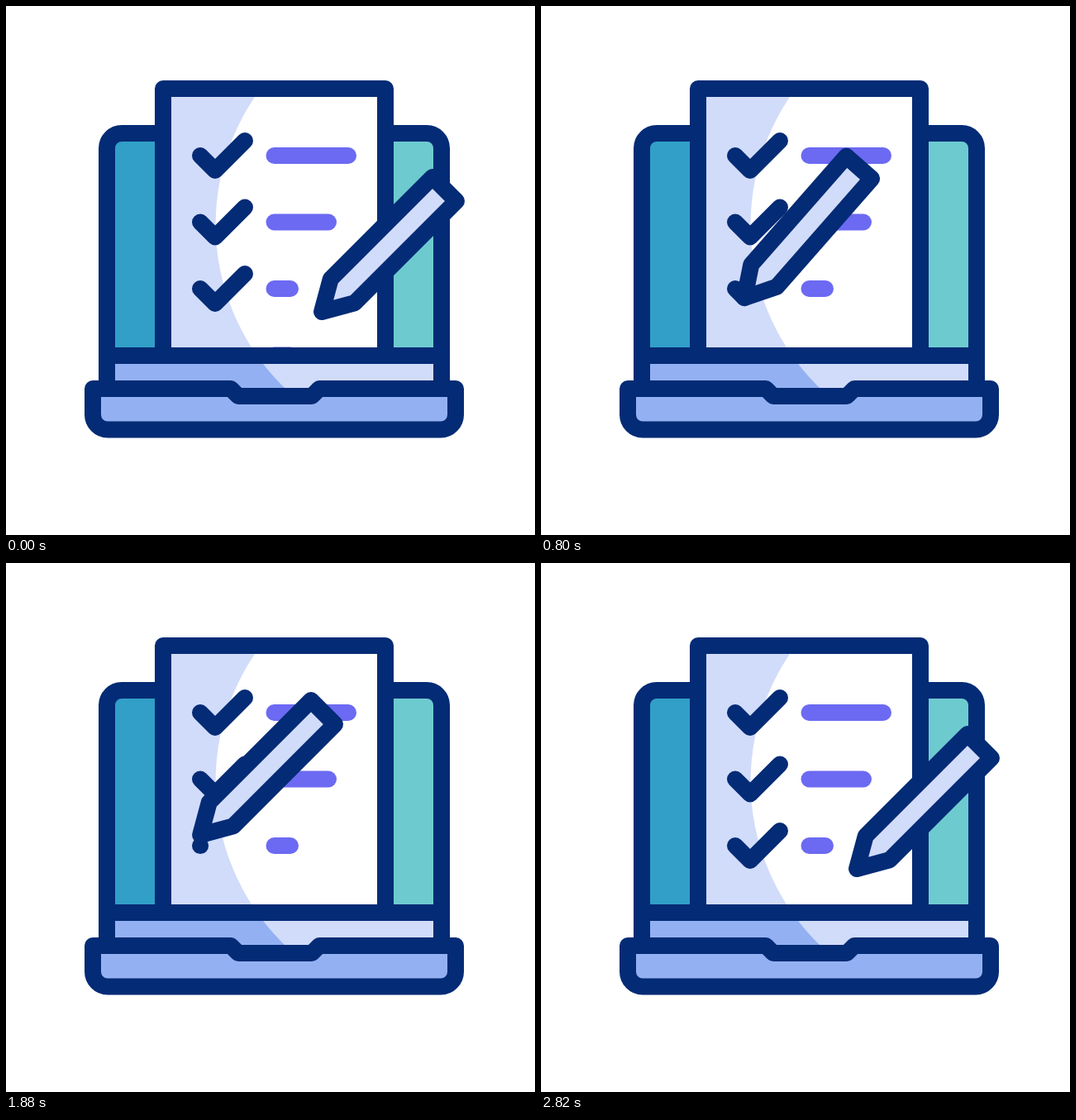
These frames come from a looping animation (640x640 px, 3000 ms). An HTML page with a canvas:

```html
<!DOCTYPE html>
<html lang="en">
<head>
<meta charset="utf-8">
<title>Checklist</title>
<style>
  html, body { margin: 0; width: 100%; height: 100%; overflow: hidden; background: #fff; }
  canvas { display: block; width: 640px; height: 640px; }
</style>
</head>
<body>
<canvas id="stage" width="640" height="640"></canvas>
<script>
const ctx = document.getElementById('stage').getContext('2d');
const LOOP = 3000;
const INK = '#042b75', PALE = '#d1dcfa', BLUE = '#93b1f2', BAR = '#6c6af2';
const ROW_TOP = 181, ROW_GAP = 80.5;
const BAR_ENDS = [414, 390, 344, 344];
const REST = [382, 370], START = [235, 342], CORNER = [253, 360], END = [289, 324];
const HOVER = [235, 329];
const TILT = 18;

const mix = (a, b, k) => a + (b - a) * k;
const mixPoint = (a, b, k) => [mix(a[0], b[0], k), mix(a[1], b[1], k)];
const clamp = k => Math.min(1, Math.max(0, k));
const span = (t, from, to) => clamp((t - from) / (to - from));
const ease = k => (1 - Math.cos(Math.PI * k)) / 2;
const eased = (t, from, to) => ease(span(t, from, to));

function bezier(a, b, c, d, k) {
  const ab = mixPoint(a, b, k), bc = mixPoint(b, c, k), cd = mixPoint(c, d, k);
  return mixPoint(mixPoint(ab, bc, k), mixPoint(bc, cd, k), k);
}

// Position on the tick, whose second leg is twice as long as the first.
function alongTick(start, k) {
  return k < 1 / 3 ? mixPoint(start, CORNER, k * 3) : mixPoint(CORNER, END, (k * 3 - 1) / 2);
}

function line(points, color = INK) {
  ctx.beginPath();
  points.forEach(p => ctx.lineTo(...p));
  ctx.strokeStyle = color;
  ctx.stroke();
}

function rect(color, x, y, w, h) {
  ctx.fillStyle = color;
  ctx.fillRect(x, y, w, h);
}

function clipped(shape, draw) {
  ctx.save();
  ctx.beginPath();
  shape();
  ctx.clip();
  draw();
  ctx.restore();
}

const lightDisc = () => ctx.arc(528.9, 264.5, 275.3, 0, Math.PI * 2);

function drawScreen() {
  ctx.beginPath();
  ctx.moveTo(122, 463);
  ctx.arcTo(122, 154, 200, 154, 18);
  ctx.arcTo(527, 154, 527, 300, 18);
  ctx.lineTo(527, 463);
  ctx.fillStyle = '#319fc8';
  ctx.fill();
  clipped(() => ctx.rect(320, 140, 230, 290), () => {
    ctx.fillStyle = '#6dcbd0';
    ctx.beginPath();
    ctx.moveTo(320, 423);
    ctx.lineTo(320, 154);
    ctx.arcTo(527, 154, 527, 300, 18);
    ctx.lineTo(527, 423);
    ctx.fill();
  });
  rect(BLUE, 122, 423, 405, 50);
  clipped(lightDisc, () => rect(PALE, 122, 423, 405, 50));
  ctx.beginPath();
  ctx.moveTo(122, 463);
  ctx.arcTo(122, 154, 200, 154, 18);
  ctx.arcTo(527, 154, 527, 300, 18);
  ctx.lineTo(527, 463);
  ctx.strokeStyle = INK;
  ctx.stroke();
}

function drawTick(dy, amount) {
  const points = [START];
  if (amount > 1 / 3) points.push(CORNER);
  points.push(alongTick(START, amount));
  line(points.map(([x, y]) => [x, y + dy]));
}

function drawRows(scroll, drawn) {
  for (let i = 0; i < 4; i++) {
    const y = ROW_TOP + ROW_GAP * (i - scroll);
    const end = mix(BAR_ENDS[i], BAR_ENDS[Math.max(0, i - 1)], scroll);
    ctx.globalAlpha = i === 0 ? 1 - span(scroll, 0.28, 0.66) : 1;
    if (ctx.globalAlpha === 0) continue;
    line([[324.5, y], [end, y]], BAR);
    const amount = i < 3 ? 1 : drawn;
    if (amount > 0) drawTick(y - START[1], amount);
  }
  ctx.globalAlpha = 1;
}

function drawPaper(scroll, drawn) {
  rect(PALE, 190, 100, 269, 323);
  clipped(() => ctx.rect(190, 100, 269, 323), () => {
    clipped(lightDisc, () => rect('#fff', 190, 100, 269, 323));
    drawRows(scroll, drawn);
  });
  line([[190, 423], [190, 100], [459, 100], [459, 423]]);
  line([[122, 423], [527, 423]]);
}

function drawBase() {
  ctx.beginPath();
  ctx.moveTo(105, 463);
  [[272, 463], [281, 472], [370, 472], [379, 463], [544, 463]].forEach(p => ctx.lineTo(...p));
  ctx.arcTo(544, 512.5, 400, 512.5, 18);
  ctx.arcTo(105, 512.5, 105, 463, 18);
  ctx.closePath();
  ctx.fillStyle = BLUE;
  ctx.fill();
  ctx.strokeStyle = INK;
  ctx.stroke();
}

function drawPencil([x, y], tilt) {
  ctx.save();
  ctx.translate(x, y);
  ctx.rotate(-(45 + tilt) * Math.PI / 180);
  ctx.beginPath();
  [[0, 0], [35.7, -20.5], [210, -20.5], [210, 20.5], [35.7, 20.5]].forEach(p => ctx.lineTo(...p));
  ctx.closePath();
  ctx.fillStyle = PALE;
  ctx.fill();
  ctx.strokeStyle = INK;
  ctx.stroke();
  ctx.restore();
}

function pencilPose(t) {
  if (t < 690) return [mixPoint(REST, START, eased(t, 200, 695)), 0];
  if (t < 1060) {
    const k = eased(t, 690, 1060);
    return [alongTick(START, k), TILT * k];
  }
  if (t < 1870) {
    const k = eased(t, 1080, 1870);
    return [bezier(END, [338, 401], [269, 404], HOVER, k), TILT * (1 - k)];
  }
  if (t < 2240) {
    const k = eased(t, 1870, 2240);
    return [alongTick(HOVER, k), TILT * k];
  }
  const k = eased(t, 2240, 2820);
  return [mixPoint(END, REST, k), TILT * (1 - k)];
}

function render(t) {
  const second = t >= 1090;
  const scroll = second ? eased(t, 1090, 1550) : eased(t, 200, 660);
  const drawn = second ? eased(t, 1870, 2240) : eased(t, 690, 1060);
  rect('#fff', 0, 0, 640, 640);
  ctx.lineWidth = 20;
  ctx.lineCap = ctx.lineJoin = 'round';
  drawScreen();
  drawPaper(scroll, drawn);
  drawBase();
  drawPencil(...pencilPose(t));
}

const began = performance.now();
function tick() {
  render((performance.now() - began) % LOOP);
  requestAnimationFrame(tick);
}
tick();
</script>
</body>
</html>
```
